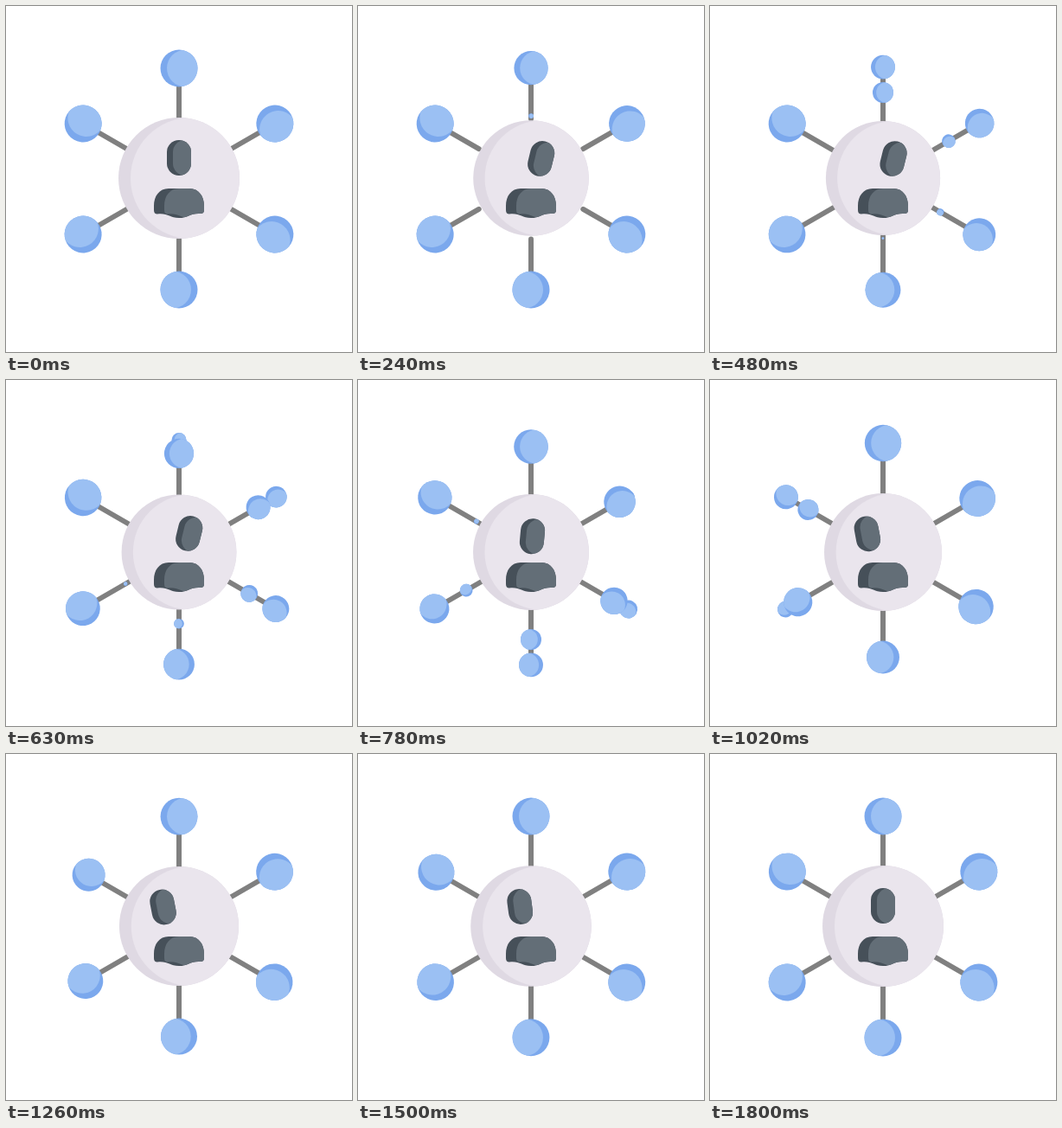
Write an HTML page that moves like this. It is 400 px wide and 400 px high and loops after 1860 ms.

```html
<!DOCTYPE html>
<html lang="en">
<head>
<meta charset="utf-8">
<title>Network hub</title>
<style>
  html, body { margin: 0; width: 100%; height: 100%; overflow: hidden; background: #fff; }
  svg { display: block; width: 100vw; height: 100vh; }
</style>
</head>
<body>
<svg viewBox="0 0 400 400">
  <defs>
    <circle id="disc" r="21.5"/>
    <circle id="hubDisc" r="70"/>
    <rect id="headShape" x="-14" y="-20.5" width="28" height="41" rx="14"/>
    <path id="bodyShape" d="M171 236V231C171 220 177 211 188 211H212C223 211 229 220 229 231V236Q229 240 225 240C213 239 211 245 200 245S187 239 175 240.500Q171 240.500 171 236Z"/>
    <clipPath id="discClip"><use href="#disc"/></clipPath>
    <clipPath id="hubClip"><use href="#hubDisc"/></clipPath>
    <clipPath id="headClip"><use href="#headShape"/></clipPath>
    <clipPath id="bodyClip"><use href="#bodyShape"/></clipPath>
    <g id="node">
      <use href="#disc" fill="#7ba8ed"/>
      <g clip-path="url(#discClip)"><use href="#disc" x="7.5" fill="#9bc0f3"/></g>
    </g>
  </defs>
  <g id="spokes" stroke="#808080" stroke-width="6" stroke-linecap="round"></g>
  <g id="nodes"></g>
  <g id="hub">
    <use href="#hubDisc" fill="#dfd9e3"/>
    <g clip-path="url(#hubClip)"><use href="#hubDisc" x="14" fill="#eae5ed"/></g>
  </g>
  <g id="head">
    <use href="#headShape" fill="#465059"/>
    <g clip-path="url(#headClip)"><use href="#headShape" x="7" fill="#636e77"/></g>
  </g>
  <use href="#bodyShape" fill="#465059"/>
  <g clip-path="url(#bodyClip)"><use href="#bodyShape" x="12" fill="#636e77"/></g>
</svg>
<script>
const LOOP = 1860, STEP = 30, LAST = 1800;
const DELAYS = [0, 100, 200, 300, 410, 540];
const REACH = 128, ORIGIN = 64.5;
const byId = id => document.getElementById(id);

function add(parent, tag, attrs) {
  const el = document.createElementNS('http://www.w3.org/2000/svg', tag);
  for (const key in attrs) el.setAttribute(key, attrs[key]);
  return parent.appendChild(el);
}

const clamp = x => Math.min(1, Math.max(0, x));
const mix = (a, b, u) => a + (b - a) * u;
// Sine ease between two times, from 0 to 1
const ease = (t, start, end) => (1 - Math.cos(Math.PI * clamp((t - start) / (end - start)))) / 2;

// Growth of a fresh node: slow start, long settling tail
const sigmoid = t => 1 / (1 + Math.exp((425 - t) / 139));
const growth = t => clamp((sigmoid(t) - sigmoid(100)) / (1 - sigmoid(100)));

const arms = DELAYS.map((delay, i) => {
  const turn = `translate(200 200) rotate(${i * 60})`;
  const spoke = add(byId('spokes'), 'line', { y2: -REACH, transform: turn });
  const group = add(byId('nodes'), 'g', { transform: turn });
  const old = add(group, 'use', { href: '#node' });
  const fresh = add(group, 'use', { href: '#node' });
  return { delay, spoke, old, fresh };
});

function place(el, distance, scale) {
  el.setAttribute('transform', `translate(0 ${-distance}) scale(${scale})`);
  el.setAttribute('visibility', scale > 0.001 ? 'visible' : 'hidden');
}

function drawArm(arm, t) {
  const local = Math.max(0, t - arm.delay);
  const grown = growth(local);
  const left = clamp(1 - (local / 810) ** 2);
  place(arm.old, REACH + 4 * (1 - left), left);
  place(arm.fresh, mix(ORIGIN, REACH, grown), grown);
  arm.spoke.setAttribute('y1', -mix(70, 66, ease(t, 200, 400)));
}

function drawHub(t) {
  const radius = 70 - 4 * ease(t, 0, 340) + 4 * ease(t, 340, 1700);
  byId('hub').setAttribute('transform', `translate(200 199) scale(${radius / 70})`);
}

function drawHead(t) {
  const right = ease(t, 0, 270);
  const across = ease(t, 600, 1050);
  const back = ease(t, 1350, 1750);
  const x = 200 + 12 * right - 30.5 * across + 18.5 * back;
  const dip = 4.3 * Math.sin(Math.PI * clamp((t - 600) / 450));
  const y = 175.5 + right + 0.5 * across - 1.5 * back + dip;
  const angle = 14 * right - 25 * across + 11 * back;
  byId('head').setAttribute('transform', `translate(${x} ${y}) rotate(${angle})`);
}

function draw(t) {
  arms.forEach(arm => drawArm(arm, t));
  drawHub(t);
  drawHead(t);
}

const began = performance.now();
function tick() {
  const t = (performance.now() - began) % LOOP;
  draw(Math.min(LAST, Math.floor(t / STEP) * STEP));
  requestAnimationFrame(tick);
}
tick();
</script>
</body>
</html>
```
